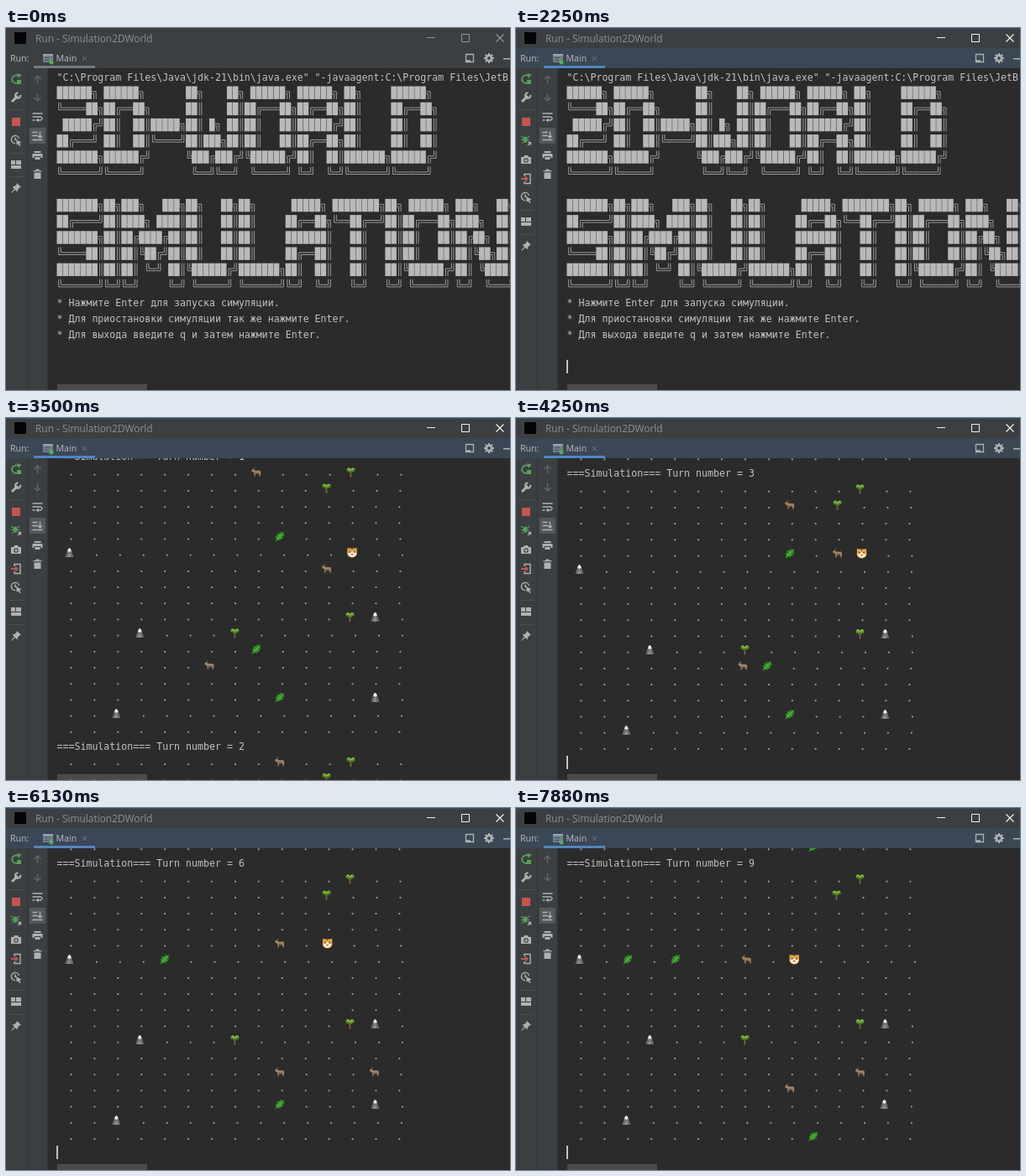
Write an HTML page with a canvas that moves like this. It is 600 px wide and 432 px high and loops after 8 s.

```html
<!DOCTYPE html>
<html lang="ru">
<meta charset="utf-8">
<title>Run - Simulation2DWorld</title>
<style>
html, body { margin: 0; width: 100%; height: 100%; overflow: hidden; background: #2b2b2b; }
canvas { display: block; }
</style>
<canvas width="600" height="432"></canvas>
<script>
const ctx = document.querySelector('canvas').getContext('2d');

const LOOP = 8000, STEP = 125;
const FOCUS_AT = 1000, FIRST_TURN = 2265, TURN_TIME = 608;
const LINE = 19.2, CHAR = 6.98, LEFT = 61, FIRST_LINE = 58;
const COLS = 15, ROWS = 17, HEADER_TOP = 65.4, CELL = CHAR * 4;
const TURN_LINES = ROWS + 1, TURN_START = 19;
const MONO = '11.6px "DejaVu Sans Mono", monospace';
const UI = '"Open Sans", "Noto Sans", sans-serif';
const TEXT = '#bbbbbb', ICON = '#afb1b3', GREEN = '#56a05a', PANEL = '#3c3f41';

const INTRO = String.raw`"C:\Program Files\Java\jdk-21\bin\java.exe" "-javaagent:C:\Program Files\JetBrains\
██████╗ ██████╗       ██╗    ██╗ ██████╗ ██████╗ ██╗     ██████╗
╚════██╗██╔══██╗      ██║    ██║██╔═══██╗██╔══██╗██║     ██╔══██╗
 █████╔╝██║  ██║█████╗██║ █╗ ██║██║   ██║██████╔╝██║     ██║  ██║
██╔═══╝ ██║  ██║╚════╝██║███╗██║██║   ██║██╔══██╗██║     ██║  ██║
███████╗██████╔╝      ╚███╔███╔╝╚██████╔╝██║  ██║███████╗██████╔╝
╚══════╝╚═════╝        ╚══╝╚══╝  ╚═════╝ ╚═╝  ╚═╝╚══════╝╚═════╝

███████╗██╗███╗   ███╗██╗   ██╗██╗      █████╗ ████████╗██╗ ██████╗ ███╗   ██╗
██╔════╝██║████╗ ████║██║   ██║██║     ██╔══██╗╚══██╔══╝██║██╔═══██╗████╗  ██║
███████╗██║██╔████╔██║██║   ██║██║     ███████║   ██║   ██║██║   ██║██╔██╗ ██║
╚════██║██║██║╚██╔╝██║██║   ██║██║     ██╔══██║   ██║   ██║██║   ██║██║╚██╗██║
███████║██║██║ ╚═╝ ██║╚██████╔╝███████╗██║  ██║   ██║   ██║╚██████╔╝██║ ╚████║
╚══════╝╚═╝╚═╝     ╚═╝ ╚═════╝ ╚══════╝╚═╝  ╚═╝   ╚═╝   ╚═╝ ╚═════╝ ╚═╝  ╚═══╝
* Нажмите Enter для запуска симуляции.
* Для приостановки симуляции так же нажмите Enter.
* Для выхода введите q и затем нажмите Enter.`.split('\n');

// kind, column, row, first turn, last turn
const PLANTED = [
  ['palm', 12, 0], ['palm', 11, 1], ['palm', 12, 9], ['palm', 0, 7, 0, 0], ['palm', 7, 10, 1],
  ['mountain', 0, 5], ['mountain', 13, 9], ['mountain', 3, 10], ['mountain', 13, 14], ['mountain', 2, 15],
  ['plant', 9, 4, 0, 5], ['plant', 2, 5, 7], ['plant', 8, 11, 0, 3], ['plant', 4, 5, 4],
  ['plant', 9, 14, 0, 7], ['plant', 10, 16, 8],
];
// kind, first turn, "column,row" for each turn
const WALKERS = [
  ['goat', 0, '7,0 8,0 9,0 9,1 9,2 9,3 9,4 8,4 8,5 7,5'],
  ['goat', 0, '12,6 11,6 11,5 11,4'],
  ['goat', 0, '5,12 6,12 7,12 7,11 8,11 9,11 9,12 9,13 9,14 9,13'],
  ['goat', 4, '13,10 13,11 13,12 12,12 12,13 12,12'],
  ['tiger', 0, '12,5 12,5 12,4 12,4 11,4 11,3 11,4 10,4 10,5 9,5'],
];

// Layers of [colour, path] around the cell centre
const SPRITES = {
  mountain: [['#6c6c6c', 'M-4 5.5 L-1 -3 Q1 -7 3 -3 L6 5.5Z'], ['#909090', 'M-1.5 5.5 L1 0 L3 5.5Z'],
    ['#f4f4f4', 'M-1.4 -1 L-.6 -4 Q1 -6.5 2.6 -4 L3.400 -1 L2 -1.6 L1 0 L0 -1.6Z']],
  palm: [['#8a6238', 'M-.8 -2 L.6 -2 L.8 6 L-1 6Z'],
    ['#5c9a26', 'M0 -3 Q-2 -7 -5 -4 L-4.5 0 L-3 -2 L-2 1 L0 -2 L2 1 L3 -2 L4.5 0 L5 -4 Q2 -7 0 -3Z'],
    ['#8cc63f', 'M-4 -4 Q-1 -6 0 -3 Q1 -6 4 -4 L0 -2Z']],
  plant: [['#2c8a22', 'M-5.5 6 L-4 3 L-5 0 L-3 -1 L-3 -4 L-.5 -3 L1 -6 L2.5 -4 L5.5 -5.500 L4.5 -2.5 L6 -1 L3.5 .5 L4.5 2.5 L1.5 3 L1 5 L-2 4 L-4.5 6Z'],
    ['#57bd3c', 'M-4 4.2 L4 -4.500 L4.500 -3.600 L-3 4.500Z M-3.5 0 L-1 1 L-2 2Z M-1.500 -2.500 L1 -1.500 L0 0Z M1 3 L1 .5 L2.500 1.500Z']],
  goat: [['#a08063', 'M-5.5 -2.4 L-3.4 -4.2 L-1.5 -2 L4.5 -1.800 L5.500 0 L5 5.3 L3.8 5.3 L3.200 2.400 L-.6 2.400 L-1 5.3 L-2.2 5.3 L-2.7 .8 L-5.300 -.8Z'],
    ['#57463a', 'M-3.600 -3.500 L-3 -6 L.3 -4.400 L-2 -3.900Z M-2.300 3.8 h1.300 v1.700 h-1.300Z M3.700 3.8 h1.400 v1.700 h-1.400Z M-2.500 1.200 H3.200 V2.400 H-.6Z']],
  tiger: [['#e9a045', 'M-5.600 -5.700 L-3 -5 L3 -5 L5.600 -5.700 L5.800 1.500 Q4.500 5.800 0 6 Q-4.500 5.800 -5.800 1.500Z'],
    ['#fbe8c6', 'M-5.500 1 L-3 .5 L-1 -1.500 L1 -1.500 L3 .5 L5.500 1 L4 4.200 L0 5.700 L-4 4.200Z'],
    ['#4a3420', 'M-3.200 -1.500 h1.400 v1.500 h-1.400Z M1.800 -1.500 h1.400 v1.500 h-1.400Z M-1.200 1.500 h2.400 L0 3.200Z M-.5 -5 h1 v1.500 h-1Z']],
};

function rect(x, y, w, h, color) {
  ctx.fillStyle = color;
  ctx.fillRect(x, y, w, h);
}

function text(s, x, y, font, color = TEXT) {
  ctx.font = font;
  ctx.fillStyle = color;
  ctx.fillText(s, x, y + 4);
}

function consoleText(s, y) {
  text(s, LEFT - .5, Math.round(y + 1), MONO, '#c2c2c2');
}

function shape(x, y, d, color, width = 0) {
  const path = new Path2D(d);
  ctx.save();
  ctx.translate(x, y);
  ctx.fillStyle = ctx.strokeStyle = color;
  ctx.lineWidth = width;
  if (width) ctx.stroke(path); else ctx.fill(path);
  ctx.restore();
}

const CORNERS = { '╔': [1, 1], '╗': [-1, 1], '╚': [1, -1], '╝': [-1, -1] };
const HALF = 7.7, GAP = 1.3;

function bannerChar(c, x, y) {
  if (c === '█') return rect(x, y - HALF, CHAR - .4, HALF * 2, '#b9b9b9');
  const w = CHAR / 2;
  let d = '';
  for (const s of [-GAP, GAP]) {
    if (c === '═') d += `M${-w} ${s}H${w}`;
    else if (c === '║') d += `M${s} ${-HALF}V${HALF}`;
    else if (CORNERS[c]) {
      const [h, v] = CORNERS[c];
      d += `M${h * w} ${v * s}H${h * s}V${v * HALF}`;
    }
  }
  if (d) shape(x + w, y, d, '#a8a8a8', .9);
}

function drawIntro(scroll) {
  INTRO.forEach((line, i) => {
    const y = FIRST_LINE + i * LINE - scroll;
    if (i >= 1 && i <= 13) [...line].forEach((c, k) => bannerChar(c, LEFT - .5 + k * CHAR, y));
    else consoleText(line, y);
  });
}

function worldAt(turn) {
  const cells = {};
  for (const [kind, col, row, from = 0, to = 99] of PLANTED)
    if (turn >= from && turn <= to) cells[[col, row]] = kind;
  for (const [kind, from, path] of WALKERS) {
    const place = path.split(' ')[turn - from];
    if (place) cells[place] = kind;
  }
  return cells;
}

function drawTurn(turn, top) {
  consoleText(`===Simulation=== Turn number = ${turn}`, top);
  const cells = worldAt(turn);
  for (let row = 0; row < ROWS; row++) {
    const y = top + (row + 1) * LINE;
    let shift = 0; // pictures are a little wider than dots
    for (let col = 0; col < COLS; col++) {
      const kind = cells[[col, row]], x = 74.5 + col * CELL + shift;
      if (kind) {
        for (const [color, d] of SPRITES[kind]) shape(x, y, d, color);
        shift += kind === 'mountain' ? 2.5 : 1;
      } else rect(x + 2.1, y + 2.2, 1.8, 1.8, '#a8a8a8');
    }
  }
}

function drawConsole(t) {
  const turn = Math.floor((t - FIRST_TURN) / TURN_TIME);
  const age = t - FIRST_TURN - turn * TURN_TIME;
  const headerY = n => FIRST_LINE + (TURN_START + n * TURN_LINES) * LINE;
  const scrollOf = n => n < 0 ? 0 : headerY(n) - HEADER_TOP;
  const playing = turn >= 0;
  const p = Math.min(1, Math.max(0, (age - 15) / 69));
  const scroll = playing ? scrollOf(turn - 1) + (scrollOf(turn) - scrollOf(turn - 1)) * p : 0;

  ctx.save();
  ctx.beginPath();
  ctx.rect(50, 48, 550, 384);
  ctx.clip();
  rect(50, 48, 550, 384, '#2b2b2b');
  rect(61, 425, 107, 7, '#4b4b4b');
  if (turn < 1) drawIntro(scroll);
  for (let n = Math.max(0, turn - 1); n <= turn; n++) drawTurn(n, headerY(n) - scroll);

  const blink = playing ? age < 500 : t >= FOCUS_AT && (t - FOCUS_AT) % 1000 < 500;
  const caretY = playing ? headerY(turn + 1) - scroll : FIRST_LINE + 18 * LINE;
  if (blink) rect(60, Math.round(caretY - 8), 2, 16, '#c4c4c4');
  ctx.restore();
}

function drawHeader(focused) {
  rect(0, 0, 600, 432, PANEL);
  if (focused) rect(0, 0, 600, 1, '#2a5378');
  rect(10, 5, 14, 14, '#050507');
  text('Run - Simulation2DWorld', 35, 13, '11.9px ' + UI, '#8d8f91');
  const button = focused ? '#f0f0f0' : '#929394';
  shape(506, 11.5, 'M-5 0H5', button, 1);
  shape(547, 12, 'M-4.500 -4.500H4.500V4.500H-4.500Z', button, 1);
  shape(588, 12, 'M-4.5 -4.5L4.5 4.5M4.5 -4.5L-4.5 4.5', button, 1.2);

  rect(0, 24, 600, 24, focused ? '#3b4754' : PANEL);
  text('Run:', 5, 36, '10.6px ' + UI);
  rect(44, 31, 12, 10, '#73808a');
  rect(44, 31, 12, 2, '#9aa7b0');
  shape(49, 37, 'M-3 -1.500H3M-3 1.500H2', '#46525c', 1);
  shape(54, 41, 'M-2.500 0a2.500 2.500 0 1 0 5 0a2.500 2.500 0 1 0 -5 0', '#4fb24f');
  text('Main', 59.5, 36, '10.6px ' + UI);
  shape(93.5, 36.5, 'M-2.5 -2.5L2.5 2.5M2.5 -2.5L-2.5 2.5', '#777b7e', 1);
  rect(33, 45, 73, 3, focused ? '#4a88c7' : '#747a80');
  shape(552, 36, 'M-4.500 -4.500H4.500V4.500H-4.500Z M-4.500 3H1', ICON, 1.3);
  shape(575, 36, 'M-3.2 0a3.2 3.2 0 1 0 6.4 0a3.2 3.2 0 1 0 -6.4 0', ICON, 2.6);
  shape(575, 36, 'M0 -6V-4M0 4V6M-6 0H-4M4 0H6M-4.2 -4.2L-3 -3M3 3L4.2 4.2M-4.2 4.2L-3 3M3 -3L4.2 -4.2', ICON, 2);
  rect(592, 36, 8, 1.5, ICON);
}

const ICONS = {
  rerun: y => {
    shape(12, y, 'M4.500 1A4.700 4.700 0 1 1 2 -4', GREEN, 1.8);
    shape(12, y, 'M1 -7L6.500 -5.500L3 -1Z', GREEN);
    rect(13, y + 1, 5, 5, GREEN);
  },
  wrench: y => {
    shape(12, y, 'M-5 5L2 -2', ICON, 3);
    shape(12, y, 'M5.200 -3.200A3.200 3.200 0 1 1 2.500 -5.500', ICON, 2);
  },
  stop: y => rect(7, y - 4, 10, 10, '#c75450'),
  bug: y => {
    shape(11, y - 1, 'M-2.500 -2Q0 -5 2.500 -2L2.500 2Q0 6 -2.500 2Z', GREEN);
    shape(11, y - 1, 'M-5 -4L-2.500 -2M5 -4L2.500 -2M-5 .500H5M-4 5L-2.500 3', GREEN, 1.1);
    shape(15, y + 3, 'M-1 3L2.500 -.500M-.500 -.500H2.500V2.500', ICON, 1.3);
  },
  camera: y => {
    shape(12, y, 'M-6 -3H-3L-2 -5H2L3 -3H6V5H-6Z', ICON);
    shape(12, y + 1, 'M-2.200 0a2.200 2.200 0 1 0 4.400 0a2.200 2.200 0 1 0 -4.400 0', PANEL, 1.2);
  },
  exit: y => {
    shape(13, y, 'M-3 -3V-5.500H4V5.500H-3V3', ICON, 1.4);
    shape(12, y, 'M-6 -1H-1V-3.500L3 0L-1 3.500V1H-6Z', '#c75450');
  },
  clock: y => {
    shape(11, y - 1, 'M4.500 -1A4.600 4.600 0 1 0 0 4.600M0 -2.500V.500H2', ICON, 1.4);
    shape(14.5, y + 2.5, 'M-2 -3L4 0L1.500 1L3 4L1.500 4.500L0 2L-2 3Z', ICON);
  },
  layout: y => {
    rect(6, y - 5, 5, 5, ICON);
    rect(12, y - 5, 6, 5, ICON);
    rect(6, y + 1, 12, 4, ICON);
  },
  pin: y => shape(12, y, 'M1 -6L6 -1L4 -.500L2 2L1.500 4.500L-1 2L-5.500 6L-6 5.500L-2 1L-4.500 -1.500L-2 -2L.500 -4Z', ICON),
};

function drawSidebar(focused) {
  const column = { rerun: 61, wrench: 83, stop: 111, ...(focused
    ? { bug: 134, camera: 157, exit: 180, clock: 202, layout: 231, pin: 260 }
    : { clock: 134, layout: 163, pin: 191 }) };
  for (const name in column) ICONS[name](column[name]);
  for (const y of [97, column.layout - 14, column.pin - 14]) rect(4, y, 17, 1, '#4d5052');
  rect(25, 48, 1, 384, '#323435');
  rect(49, 48, 1, 384, '#323435');

  const x = 37.5, dim = '#606365';
  shape(x, 61, 'M0 5V-4M-4 0L0 -4L4 0', dim, 1.5);
  shape(x, 83, 'M0 -5V4M-4 0L0 4L4 0', dim, 1.5);
  shape(x, 106, 'M-6 -4H6M-6 0H4Q7 2 4 4H0M-6 4H-3', ICON, 1.5);
  shape(x, 106, 'M-2 4L1 1.500V6.500Z', ICON);
  rect(28, 119, 19, 19, '#54585b');
  shape(x, 128.5, 'M-6 -4H0M-6 0H0M-6 5H6M3 -5V2M.500 0L3 2.500L5.500 0', ICON, 1.4);
  shape(x, 152, 'M-4 -5H4V-3H-4Z M-6 -2H6V3H4V1H-4V3H-6Z M-3 2H3V5H-3Z', ICON);
  shape(x, 174, 'M-5 -4H-2V-5.500H2V-4H5V-2.700H-5Z M-4 -1.500H4V6H-4Z', ICON);
}

function draw(t) {
  const focused = t >= FOCUS_AT;
  drawHeader(focused);
  drawSidebar(focused);
  drawConsole(t);
}

const start = performance.now();
let shown = -1;
function tick() {
  const elapsed = (performance.now() - start) % LOOP;
  const t = Math.floor(elapsed / STEP) * STEP;
  if (t !== shown) draw(shown = t);
  requestAnimationFrame(tick);
}
tick();
</script>
</html>
```
